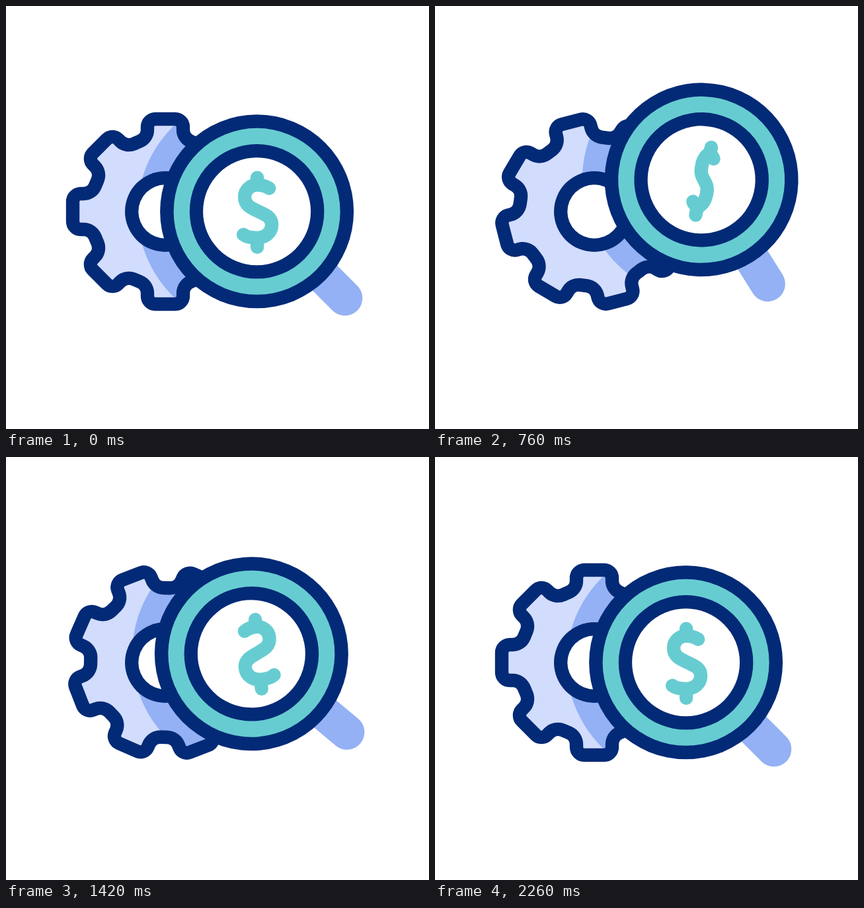
An HTML page with a canvas for the animation above (2400 ms loop, 640 by 640 pixels).

```html
<!DOCTYPE html>
<html lang="en">
<head>
<meta charset="utf-8">
<title>Gear and magnifier</title>
<style>
  html, body { margin: 0; width: 100%; height: 100%; overflow: hidden; background: #fff; }
  canvas { display: block; width: 640px; height: 640px; }
</style>
</head>
<body>
<canvas id="stage" width="640" height="640"></canvas>
<script>
const ctx = document.getElementById('stage').getContext('2d');
const LOOP = 2400, STEP = 20, TAU = Math.PI * 2;
const NAVY = '#032a76', LIGHT = '#d2dcfd', BLUE = '#93b1f4', TEAL = '#67ccd1', WHITE = '#fff';
const GEAR = { x: 241, y: 311 };
const LENS = { x: 379.6, y: 310.8 };
const PIVOT = { x: 468, y: 405.5 };

// Keys are [time, value] pairs.
const GEAR_TURN = [[0, 0], [240, -71.4], [560, -153.4], [960, -231], [1240, -274], [1620, -307.4], [2260, -360]];
const LENS_TILT = [[0, 0], [405, -17.7], [845, 16], [1295, -7.4], [1720, 3.6], [2160, 0]];
const LENS_DROP = [[0, 0], [360, 55], [720, -33], [1080, 50], [1440, -22], [1800, 16], [2160, 0]];
const COIN_FLIP = [[80, 1], [474, -1], [925, 1], [1400, -1], [1810, 1]];

const rad = deg => deg * Math.PI / 180;
const clamp = v => Math.max(0, Math.min(1, v));

function segment(keys, t) {
  let i = 0;
  while (i < keys.length - 2 && t >= keys[i + 1][0]) i++;
  const [t0, v0] = keys[i], [t1, v1] = keys[i + 1];
  return { i, u: clamp((t - t0) / (t1 - t0)), v0, v1, span: t1 - t0 };
}

function swing(keys, t) {
  const { u, v0, v1 } = segment(keys, t);
  return v0 + (v1 - v0) * (1 - Math.cos(Math.PI * u)) / 2;
}

function smooth(keys, t) {
  const { i, u, v0, v1, span } = segment(keys, t);
  const slope = k => {
    const a = keys[Math.max(0, k - 1)], b = keys[Math.min(keys.length - 1, k + 1)];
    return (b[1] - a[1]) / (b[0] - a[0]) * span;
  };
  const u2 = u * u, u3 = u2 * u;
  return (2 * u3 - 3 * u2 + 1) * v0 + (u3 - 2 * u2 + u) * slope(i)
       + (3 * u2 - 2 * u3) * v1 + (u3 - u2) * slope(i + 1);
}

function disc(x, y, r, color) {
  ctx.beginPath();
  ctx.arc(x, y, r, 0, TAU);
  ctx.fillStyle = color;
  ctx.fill();
}

function line(x0, y0, x1, y1, width, color) {
  ctx.beginPath();
  ctx.moveTo(x0, y0);
  ctx.lineTo(x1, y1);
  ctx.lineWidth = width;
  ctx.strokeStyle = color;
  ctx.stroke();
}

function gearPath(turn) {
  const half = 27, tip = 140, base = 111;
  const corners = [[-half, -base, 19], [-half, -tip, 12], [half, -tip, 12], [half, -base, 19]];
  const path = new Path2D();
  path.moveTo(GEAR.x + 113 * Math.sin(turn - TAU / 16), GEAR.y - 113 * Math.cos(turn - TAU / 16));
  const points = [];
  for (let k = 0; k < 8; k++) {
    const a = turn + k * TAU / 8, c = Math.cos(a), s = Math.sin(a);
    for (const [x, y, r] of corners) points.push([GEAR.x + x * c - y * s, GEAR.y + x * s + y * c, r]);
  }
  points.forEach(([x, y, r], i) => {
    const next = points[(i + 1) % points.length];
    path.arcTo(x, y, next[0], next[1], r);
  });
  path.closePath();
  return path;
}

function drawGear(turn, lens) {
  const path = gearPath(turn);
  ctx.fillStyle = LIGHT;
  ctx.fill(path);
  ctx.save();
  ctx.clip(path);
  disc(lens.x, lens.y, 180.5, BLUE);
  ctx.restore();
  ctx.lineWidth = 20.4;
  ctx.strokeStyle = NAVY;
  ctx.stroke(path);
  disc(GEAR.x, GEAR.y, 61, NAVY);
  disc(GEAR.x, GEAR.y, 40.7, WHITE);
}

function drawDollar(flip) {
  ctx.save();
  ctx.translate(5.5 - 5 * flip, 0);
  ctx.scale(flip, 1);
  ctx.beginPath();
  ctx.moveTo(0, -51);
  ctx.lineTo(0, -40);
  ctx.moveTo(0, 40);
  ctx.lineTo(0, 54);
  ctx.moveTo(18, -35);
  ctx.bezierCurveTo(12, -39, 5, -40, 0, -40);
  ctx.bezierCurveTo(-11, -40, -19, -32, -19, -22);
  ctx.bezierCurveTo(-19, -8, -8, -5, 2, 0);
  ctx.bezierCurveTo(13, 5, 22, 9, 22, 20);
  ctx.bezierCurveTo(22, 33, 11, 40, -1, 40);
  ctx.bezierCurveTo(-9, 40, -16, 39, -21, 35);
  ctx.restore();
  ctx.lineWidth = 20.4;
  ctx.strokeStyle = TEAL;
  ctx.stroke();
}

function drawLens(lens, tilt, flip) {
  ctx.save();
  ctx.translate(lens.x, lens.y);
  ctx.rotate(tilt);
  line(90, 88, 133.2, 131.2, 53, BLUE);
  disc(0, 0, 146.5, NAVY);
  disc(0, 0, 126, TEAL);
  disc(0, 0, 101.8, NAVY);
  disc(0, 0, 81.5, WHITE);
  drawDollar(flip);
  ctx.restore();
}

function drawSpark(x0, y0, x1, y1, t) {
  const head = clamp((t - 100) / 100), tail = clamp((t - 180) / 120);
  if (head <= 0 || tail >= 1) return;
  const at = p => [x0 + (x1 - x0) * p, y0 + (y1 - y0) * p];
  line(...at(tail), ...at(head), 20, TEAL);
}

function draw(t) {
  const tilt = rad(swing(LENS_TILT, t));
  const c = Math.cos(tilt), s = Math.sin(tilt);
  const dx = LENS.x - PIVOT.x, dy = LENS.y - PIVOT.y;
  const lens = {
    x: PIVOT.x + dx * c - dy * s,
    y: PIVOT.y + dx * s + dy * c + swing(LENS_DROP, t)
  };
  ctx.fillStyle = WHITE;
  ctx.fillRect(0, 0, 640, 640);
  ctx.lineCap = ctx.lineJoin = 'round';
  drawSpark(129, 153, 111, 137, t);
  drawSpark(170.5, 131, 165.5, 109, t);
  drawGear(rad(smooth(GEAR_TURN, t)), lens);
  drawLens(lens, tilt, swing(COIN_FLIP, t));
}

const start = performance.now();
function tick() {
  const t = (performance.now() - start) % LOOP;
  draw(Math.floor(t / STEP) * STEP);
  requestAnimationFrame(tick);
}
tick();
</script>
</body>
</html>
```
